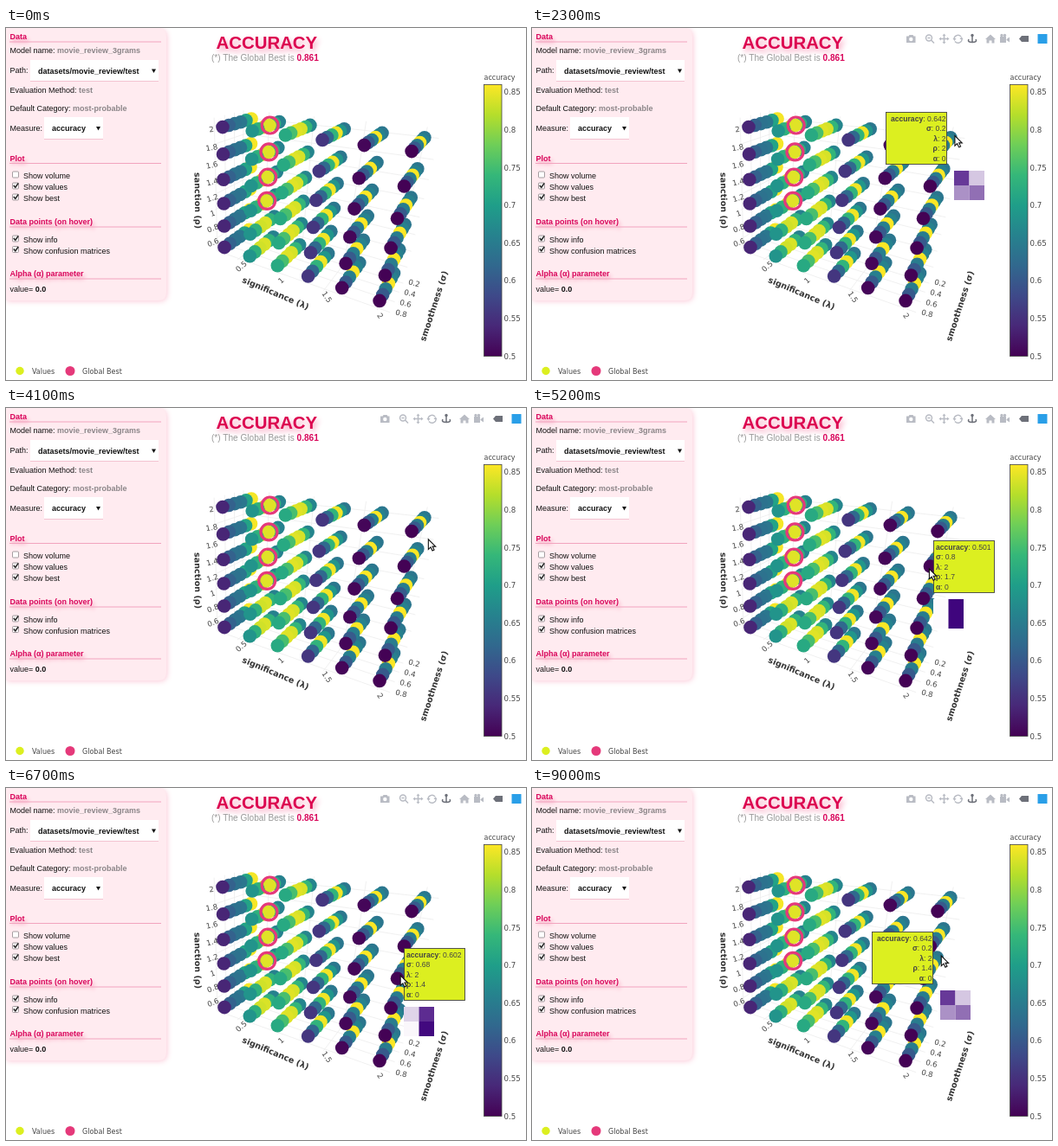
Write an HTML page that moves like this. It is 600 px wide and 407 px high and loops after 9100 ms.

```html
<!DOCTYPE html>
<html lang="en">
<head>
<meta charset="utf-8">
<title>Accuracy plot</title>
<style>
html, body { margin: 0; width: 100%; height: 100%; overflow: hidden; background: #fff; }
svg { display: block; width: 600px; height: 407px; }
text { font: 9px "Liberation Sans", Arial, sans-serif; fill: #111; white-space: pre; }
.b { font-weight: bold; }
.best { font-weight: bold; fill: #d9045a; }
.grey { font-weight: bold; fill: #8b8588; }
.head { font-weight: bold; fill: #d9045a; filter: drop-shadow(2px 4px 2px #f79ab8); }
.title { font-size: 20.4px; font-weight: bold; fill: #dc0550; filter: drop-shadow(2px 4px 3px #f79ab8); }
.sub { font-size: 10.1px; fill: #999; }
.plot text { font: 8.6px "DejaVu Sans", sans-serif; fill: #444; }
.plot .axis { font-size: 9.6px; font-weight: bold; fill: #333; }
.plot .small { font-size: 8px; }
.tip text { font-size: 8.6px; fill: #444; }
</style>
</head>
<body>
<svg id="stage" viewBox="0 0 600 407"></svg>
<script>
const LOOP = 9100;
const VIRIDIS = ["#440154", "#482878", "#3e4989", "#31688e", "#26828e",
  "#1f9e89", "#35b779", "#6ece58", "#b5de2b", "#fde725"];
const YELLOW = "#dcef20", PINK = "#e5397a";
const LOW = 0.5, HIGH = 0.861;
// Pointer stops: arrival, departure, rho row, sigma index (negative is off the data).
const STOPS = [
  [500, 500, 0, -10], [1800, 2400, 0, 0], [3100, 3400, 0, 5], [3900, 4200, 1, -2],
  [5000, 5800, 1, 5], [6300, 6800, 2, 4], [7600, 7900, 3, 3], [8700, LOOP, 2, 0]
];

const lerp = (a, b, f) => a + (b - a) * f;
const range = n => [...Array(n).keys()];
const sigma = k => +(0.2 + 0.12 * k).toFixed(2);
const rho = row => +(2 - 0.3 * row).toFixed(1);

// Accuracy peaks at a middle sigma; the ridge is widest at small lambdas.
function accuracy(col, k) {
  const bump = Math.exp(-(((col - 1.6) / 1.2) ** 2));
  const base = lerp(0.642, 0.501 + 0.22 * bump, (k / 5) ** 5.65);
  const peak = 2 * Math.min(1, col) + 0.6 * bump;
  const width = 0.62 + 1.2 * bump;
  return base + (0.86 - base) * Math.exp(-(((k - peak) / width) ** 2));
}

// Shares of each true class, in reading order.
function confusion(k) {
  const rest = 1 - k / 5;
  const first = 0.79 * rest, second = 0.43 * rest ** 2;
  return [first, 1 - first, second, 1 - second];
}

// Perspective view: u along lambda, t down from rho = 2, s from front to back.
function project(u, t, s) {
  const w = 1 - 0.255 * u + 0.165 * t + 0.11 * s;
  return {
    x: (250 + 98.7 * u + 43.6 * t + 64.2 * s) / w,
    y: (114 - 8.2 * u + 180.7 * t + 2 * s) / w + 0.6,
    w
  };
}
const dataPoint = (col, row, k) => project(col / 5, row / 5, 1 - k / 5);

function viridis(value) {
  const pos = (value - LOW) / (HIGH - LOW) * 9;
  const i = Math.min(8, Math.floor(pos));
  const channel = (hex, c) => parseInt(hex.slice(1 + 2 * c, 3 + 2 * c), 16);
  return `rgb(${[0, 1, 2].map(c =>
    Math.round(lerp(channel(VIRIDIS[i], c), channel(VIRIDIS[i + 1], c), pos - i)))})`;
}
const purple = f =>
  `rgb(${[[253, 63], [251, 5], [253, 125]].map(([a, b]) => Math.round(lerp(a, b, f)))})`;

const label = (x, y, text, cls = "", extra = "") =>
  `<text x="${x}" y="${y}" class="${cls}" ${extra}>${text}</text>`;
const dot = (x, y, r, fill) => `<circle cx="${x}" cy="${y}" r="${r}" fill="${fill}"/>`;
const box = (x, y, w, h, fill, extra = "") =>
  `<rect x="${x}" y="${y}" width="${w}" height="${h}" fill="${fill}" ${extra}/>`;
const turned = (x, y, angle, text, cls = "") =>
  label(0, 3, text, cls, `text-anchor="middle" transform="translate(${x} ${y}) rotate(${angle})"`);

function heading(y, text) {
  return label(4.5, y, text, "head") +
    `<path d="M4 ${y + 3}H179" stroke="#f2a3be"/>`;
}
function field(y, name, value) {
  return label(4.5, y, `${name} <tspan class="grey">${value}</tspan>`);
}
function select(x, y, w, h, text) {
  return box(x, y, w, h, "#fff") + label(x + 9, y + 15.5, text, "b") +
    `<path d="M${x} ${y + h - 0.5}h${w}" stroke="#f3c3d1"/>` +
    `<path d="M${x + w - 8} ${y + h / 2 - 2}h5l-2.5 4.5z" fill="#111"/>`;
}
function checkbox(y, text, on) {
  return box(7.5, y - 8, 7, 7, on ? "#f6f3f4" : "#fff", 'rx="1" stroke="#a69da1"') +
    (on ? `<path d="M8.8 ${y - 5}l2 2.3 3.4-5" fill="none" stroke="#222" stroke-width="1.5"/>` : "") +
    label(20, y, text);
}

function sidebar() {
  return '<path d="M0 0H177Q185 1 185 10V306Q185 315 176 315H0Z" fill="#ffebf0" ' +
    'style="filter:drop-shadow(1px 1px 3px #fbc9d8)"/>' +
    heading(13, "Data") +
    field(29, "Model name:", "movie_review_3grams") +
    label(4.5, 52, "Path:") + select(28, 37, 148, 25, "datasets/movie_review/test") +
    field(75, "Evaluation Method:", "test") +
    field(95.5, "Default Category:", "most-probable") +
    label(4.5, 118.5, "Measure:") + select(44, 103, 68, 26, "accuracy") +
    heading(153.5, "Plot") +
    checkbox(174, "Show volume", false) +
    checkbox(187, "Show values", true) +
    checkbox(200, "Show best", true) +
    heading(227, "Data points (on hover)") +
    checkbox(248, "Show info", true) +
    checkbox(260.5, "Show confusion matrices", true) +
    heading(287, "Alpha (α) parameter") +
    label(4.5, 305, 'value= <tspan class="b">0.0</tspan>');
}

function grid() {
  const line = (a, b) => {
    const p = project(...a), q = project(...b);
    return `M${p.x} ${p.y}L${q.x} ${q.y}`;
  };
  const lo = -0.06, hi = 1.06;
  let d = "";
  for (const i of range(8)) {
    const t = 0.2 * i / 1.5;
    d += line([lo, t, hi], [hi, t, hi]) + line([lo, t, lo], [lo, t, hi]);
  }
  for (const i of range(4)) {
    const u = (0.2 + 0.5 * i) / 1.7, s = i / 3;
    d += line([u, hi, lo], [u, hi, hi]) + line([u, lo, hi], [u, hi, hi]);
    d += line([lo, hi, s], [hi, hi, s]) + line([lo, lo, s], [lo, hi, s]);
  }
  return `<path d="${d}" fill="none" stroke="#ececec" stroke-width=".8"/>`;
}

function axes() {
  const rhoTicks = range(8).map(i => {
    const p = project(0, 0.2 * i / 1.5, 0);
    return turned(p.x - 13, p.y + 2.5, -8 - 2 * i, +(2 - 0.2 * i).toFixed(1));
  });
  const lambdaTicks = range(4).map(i => {
    const p = project((0.2 + 0.5 * i) / 1.7, 1.06, 0);
    return turned(p.x + 2.5, p.y + 9, i < 2 ? -42 : 55, 0.5 + 0.5 * i);
  });
  const sigmaTicks = range(4).map(i =>
    turned(471 - 5 * i, 295 + 11.7 * i, 14, (0.2 + 0.2 * i).toFixed(1)));
  return [...rhoTicks, ...lambdaTicks, ...sigmaTicks].join("") +
    turned(221, 199.5, 89, "sanction (ρ)", "axis") +
    turned(311, 307, 23, "significance (λ)", "axis") +
    turned(494, 321.5, -72, "smoothness (σ)", "axis");
}

function markers() {
  const points = [];
  for (const col of range(6)) for (const row of range(6)) for (const k of range(6))
    points.push({ ...dataPoint(col, row, k), fill: viridis(accuracy(col, k)) });
  points.sort((a, b) => b.w - a.w);
  const rings = range(4).map(row => {
    const p = dataPoint(1, row, 2);
    return `<circle cx="${p.x + 1}" cy="${p.y}" r="9.5" fill="none" stroke="${PINK}" stroke-width="3.2"/>` +
      dot(p.x + 1, p.y, 7, viridis(0.845));
  });
  return points.map(p => dot(p.x.toFixed(1), p.y.toFixed(1), 7.8, p.fill)).join("") + rings.join("");
}

function colorbar() {
  const stops = VIRIDIS.map((c, i) => `<stop offset="${i / 9}" stop-color="${c}"/>`).join("");
  return `<linearGradient id="scale" x1="0" y1="1" x2="0" y2="0">${stops}</linearGradient>` +
    box(551.5, 65.5, 20.5, 314, "url(#scale)", 'stroke="#444" stroke-width=".8"') +
    label(551.5, 60, "accuracy", "small") +
    range(8).map(i => label(574.5, 382.5 - 43.6 * i, +(0.5 + 0.05 * i).toFixed(2))).join("");
}

function toolbar() {
  const faint = "#b9bcc4", dark = "#6d7079";
  const stroke = (d, color = faint) =>
    `<path d="${d}" fill="none" stroke="${color}" stroke-width="1.5"/>`;
  const solid = (d, color = faint) => `<path d="${d}" fill="${color}"/>`;
  const camera = solid("M432 9.5h2.5l1-1.5h4l1 1.5h2v7.5h-10.5z") + dot(437.3, 13, 2.2, "#fff");
  const zoom = dot(458, 11.5, 4.2, faint) + dot(458, 11.5, 2.7, "#fff") +
    stroke("M460.5 14l3.5 3.5M456.5 11.5h3");
  const pan = stroke("M471 12.5h9M475.5 8v9") +
    solid("M475.5 6.5l2 2.5h-4zM475.5 18.5l2-2.5h-4zM469.5 12.5l2.5-2v4zM481.5 12.5l-2.5-2v4z");
  const orbit = stroke("M487 13a4.5 4.5 0 0 1 8-3M496 12a4.5 4.5 0 0 1-8 3.5") +
    solid("M485.5 12h4l-2 3zM493.5 13h4l-2-3z");
  const turntable = stroke("M508 9v7M504 13q-2 3.5 4 3.5t4-3.5", dark) + dot(508, 8.5, 1.7, dark);
  const home = solid("M529 7.5l6 5.5h-1.5v4.5h-3v-3h-3v3h-3v-4.5h-1.5z");
  const video = solid("M540 10h7v7h-7zM547.5 13l3.5-2.5v6l-3.5-2.5z") +
    dot(542, 8.5, 1.7, faint) + dot(545.5, 8.5, 1.7, faint);
  const tag = solid("M562 12.5l3-3.5h8v7h-8z", dark);
  return camera + zoom + pan + orbit + turntable + home + video + tag +
    box(583.5, 7, 11, 11, "#2a9fe8");
}

const stage = document.getElementById("stage");
stage.innerHTML = sidebar() +
  label(242.5, 23.5, "ACCURACY", "title") +
  label(237, 38, '(*) The Global Best is <tspan class="best">0.861</tspan>', "sub") +
  `<g class="plot">${grid()}${axes()}${markers()}${colorbar()}` +
  dot(16, 396.5, 4.7, YELLOW) + label(30, 399.5, "Values", "small") +
  dot(74, 396.5, 5.5, PINK) + label(88, 399.5, "Global Best", "small") + "</g>" +
  `<g id="toolbar">${toolbar()}</g><g id="tip" class="tip"></g>` +
  '<path id="pointer" d="M0 0V11.5L2.7 9 4.7 13.2 6.7 12.2 4.8 8.2H8.3Z" ' +
  'fill="#fff" stroke="#111" stroke-width="1.1"/>';
const [toolbarNode, tipNode, pointerNode] =
  ["toolbar", "tip", "pointer"].map(id => document.getElementById(id));

function tooltip(row, k) {
  const p = dataPoint(5, row, k);
  const px = Math.round(p.x), py = Math.round(p.y);
  const flipped = px + 75 > 536;
  const left = (flipped ? px - 75 : px + 4) + 0.5, top = py - 29.5;
  const lines = [["accuracy", accuracy(5, k).toFixed(3)], ["σ", sigma(k)],
    ["λ", 2], ["ρ", rho(row)], ["α", 0]];
  const textX = flipped ? left + 69 : left + 2.5;
  const cells = confusion(k).map((f, i) =>
    box(px + 4 + i % 2 * 17.5, py + 38 + (i >> 1) * 17, 17.5, 17, purple(f)));
  return box(left, top, 70, 60, YELLOW, 'stroke="#444" stroke-width=".9"') +
    lines.map(([name, value], i) => label(textX, top + 10 + 11.5 * i,
      `<tspan class="b">${name}</tspan>: ${value}`, "",
      `text-anchor="${flipped ? "end" : "start"}"`)).join("") + cells.join("");
}

// Pointer place in data terms; it rests at each stop and glides between them.
function pointerAt(now) {
  const i = STOPS.findLastIndex(([arrive]) => now >= arrive);
  const [, leave, row, k] = STOPS[i];
  if (now <= leave || i === STOPS.length - 1) return { row, k };
  const [arrive, , nextRow, nextK] = STOPS[i + 1];
  const f = (now - leave) / (arrive - leave);
  return { row: lerp(row, nextRow, f), k: lerp(k, nextK, f) };
}

function render(time) {
  const now = Math.floor(time % LOOP / 100) * 100;
  const active = now >= STOPS[0][0];
  for (const node of [toolbarNode, tipNode, pointerNode])
    node.style.display = active ? "" : "none";
  if (!active) return;
  const { row, k } = pointerAt(now);
  const p = dataPoint(5, row, k);
  pointerNode.setAttribute("transform",
    `translate(${p.x + lerp(5, -1, k / 5)} ${p.y + lerp(-2, 3, k / 5)})`);
  const nearRow = Math.round(row);
  const hovering = k > -0.5 && Math.abs(row - nearRow) < 0.2;
  tipNode.innerHTML = hovering ? tooltip(nearRow, Math.max(0, Math.round(k))) : "";
}

const start = performance.now();
function tick() {
  render(performance.now() - start);
  requestAnimationFrame(tick);
}
tick();
</script>
</body>
</html>
```
